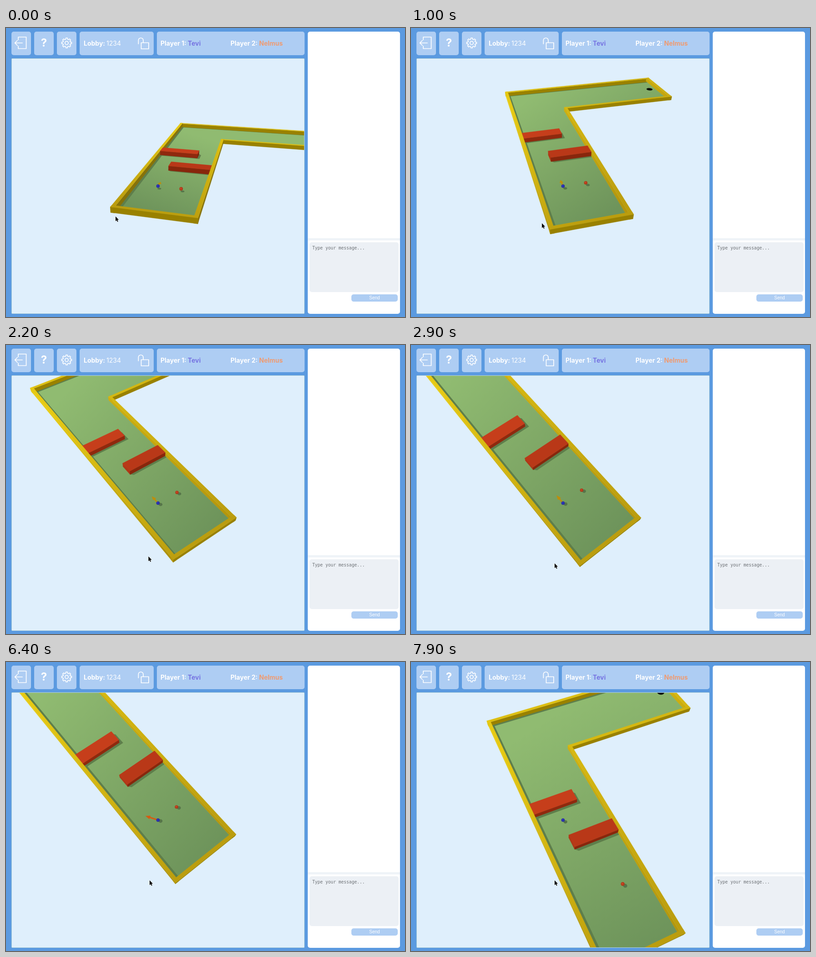
These frames come from a looping animation (878 by 638 pixels, 8000 ms). An HTML page with a canvas:

```html
<!DOCTYPE html>
<html lang="en">
<head>
<meta charset="utf-8">
<title>Minigolf lobby</title>
<style>
html, body { margin: 0; width: 100%; height: 100%; overflow: hidden; background: #5b9ae0; }
body { position: relative; font: 14px/52px Inter, "Liberation Sans", sans-serif; color: #fff; }
div, span, canvas, svg { position: absolute; white-space: nowrap; }
span { top: 0; }
.box { top: 8px; height: 52px; border-radius: 5px; background: #aecdf3; }
.bold { font-weight: 700; }
#view { left: 12px; top: 67px; border-radius: 2px; }
#chat { left: 664px; top: 8px; width: 203px; height: 623px; border-radius: 5px; background: #fff; }
#rule { left: 0; top: 456px; width: 203px; height: 5px; background: #eff3f8; }
#field { left: 4px; top: 465px; width: 196px; height: 110px; border-radius: 5px; background: #ecf0f5; }
#field span { left: 6px; top: 5px; font: 9.6px/15px "DejaVu Sans Mono", monospace; color: #6c7075; }
#send { left: 96px; top: 580px; width: 102px; height: 16px; border-radius: 5px; background: #aecdf3;
  font: 10px/15px "Liberation Sans", sans-serif; text-align: center; }
svg { left: 0; top: 0; fill: none; stroke: #fff; stroke-width: 1.7; stroke-linejoin: round; stroke-linecap: round; }
</style>
</head>
<body>
<div class="box" style="left:12px;width:43px"></div>
<div class="box bold" style="left:62px;width:43px;text-align:center;font-size:24px;line-height:50px">?</div>
<div class="box" style="left:112px;width:43px"></div>
<div class="box" style="left:162px;width:163px">
  <span class="bold" style="left:9px">Lobby:</span><span style="left:59px">1234</span>
</div>
<div class="box bold" style="left:332px;width:325px">
  <span style="left:8px">Player 1:</span><span style="left:68px;color:#7674e2">Tevi</span>
  <span style="left:162px">Player 2:</span><span style="left:225px;color:#ef9b72">Nelmus</span>
</div>
<svg width="660" height="66">
  <path d="M27 26V20H44.5V45.5H27V40M36 33H19.5M25 27.5L19.5 33L25 38.5"/>
  <path id="gear"/><circle cx="133.5" cy="33" r="3.7"/>
  <path d="M297.5 32.5H314V46H297.5ZM302 32V27A5.3 5 0 0 0 291.4 27V35"/>
</svg>
<canvas id="view" width="645" height="564"></canvas>
<div id="chat">
  <div id="rule"></div>
  <div id="field"><span>Type your message...</span></div>
  <div id="send">Send</div>
</div>
<script>
const LOOP = 8000, FOCAL = 775, DIST = 775, SHOT = 6900;
const TOP = 7, BASE = -5, GROUND = -4, RADIUS = 3.8;
const RAD = Math.PI / 180;
const view = document.getElementById('view');
const c = view.getContext('2d');

// Course: u runs across the first lane, v along it; the ball starts at 0,0.
const box = (u0, u1, v0, v1) => ({ u0, u1, v0, v1 });
const walls = {
  left: box(-59, -51, -132, 540), right: box(101, 109, -132, 375),
  near: box(-59, 109, -132, -124), lower: box(101, 460, 367, 375),
  far: box(-59, 460, 532, 540), end: box(452, 460, 367, 540)
};
const blocks = [box(-51, 53, 217, 247.5), box(-2, 101, 109, 140)];
const redBall = { u: 52, v: -1 };
const floor = [[-51, -124], [101, -124], [101, 375], [452, 375], [452, 532], [-51, 532]];
const reds = [
  { top: '#c63e1b', left: '#bf3d1a', right: '#7c210a', front: '#8f290e' },
  { top: '#b93818', left: '#b23616', right: '#7c210a', front: '#88260c' }
];

// time, azimuth, elevation (degrees)
const orbit = [
  [0, 14.8, 24.2], [1000, -14.5, 37.5], [1700, -29.8, 40.5], [2200, -36, 54],
  [2700, -37.9, 66.8], [2900, -38, 68], [3600, -38.4, 69.1], [5200, -38.5, 69.2]
];
const pointer = [[0, 241, 416], [1000, 288, 431], [1700, 307, 443], [2650, 316, 482]];

// Monotone cubic through the keys
function along(keys, t, k) {
  const n = keys.length - 1;
  if (t >= keys[n][0]) return keys[n][k];
  const slope = i => (keys[i + 1][k] - keys[i][k]) / (keys[i + 1][0] - keys[i][0]);
  const tangent = i => {
    if (i === 0) return slope(0);
    if (i === n) return 0;
    const a = slope(i - 1), b = slope(i);
    return a * b > 0 ? 2 * a * b / (a + b) : 0;
  };
  let i = 0;
  while (t >= keys[i + 1][0]) i++;
  const d = keys[i + 1][0] - keys[i][0], s = (t - keys[i][0]) / d, r = 1 - s;
  return keys[i][k] * r * r * (1 + 2 * s) + keys[i + 1][k] * s * s * (3 - 2 * s)
    + d * s * r * (tangent(i) * r - tangent(i + 1) * s);
}

const ramp = (t, a, b) => {
  const s = Math.min(1, Math.max(0, (t - a) / (b - a)));
  return s * s * (3 - 2 * s);
};

// Rolling with friction, one bounce off the left wall
function ballAt(t) {
  const s = Math.max(0, t - SHOT) / 1000;
  const v = 221 * s - 38.5 * s * s;
  return { u: v < 82 ? -0.573 * v : -47 + 0.5 * (v - 82), v };
}

let eye, ball, cosA, sinA, cosE, sinE;

function place(t) {
  const a = along(orbit, t, 1) * RAD, e = along(orbit, t, 2) * RAD;
  ball = ballAt(t);
  eye = {
    u: Math.sin(a) * Math.cos(e) * DIST,
    v: -Math.cos(a) * Math.cos(e) * DIST,
    h: Math.sin(e) * DIST
  };
  // After the shot the eye stays put until the ball drags it along
  for (let s = SHOT; s < t; s += 20) {
    const b = ballAt(Math.min(t, s + 20));
    const du = eye.u - b.u, dv = eye.v - b.v;
    const k = Math.min(1, DIST / Math.hypot(du, dv, eye.h));
    eye = { u: b.u + du * k, v: b.v + dv * k, h: eye.h * k };
  }
  const du = ball.u - eye.u, dv = ball.v - eye.v, flat = Math.hypot(du, dv);
  const dist = Math.hypot(flat, eye.h);
  sinA = -du / flat; cosA = dv / flat;
  sinE = eye.h / dist; cosE = flat / dist;
}

function project(u, v, h) {
  u -= ball.u; v -= ball.v;
  const x = u * cosA + v * sinA, y = v * cosA - u * sinA;
  const k = FOCAL / (DIST + y * cosE - h * sinE);
  return [322.5 + x * k, 282 - (y * sinE + h * cosE) * k, k];
}

function trace(pts, h) {
  c.beginPath();
  for (const p of pts) {
    const q = project(p[0], p[1], p.length > 2 ? p[2] : h);
    c.lineTo(q[0], q[1]);
  }
  c.closePath();
}

function fill(pts, h, colour) {
  trace(pts, h);
  c.fillStyle = c.strokeStyle = colour;
  c.lineWidth = 0.4;
  c.fill();
  c.stroke();
}

function fade(far, near) {
  const p = project(-20, 450, 0), q = project(40, -124, 0);
  const g = c.createLinearGradient(p[0], p[1], q[0], q[1]);
  g.addColorStop(0, far);
  g.addColorStop(1, near);
  return g;
}

const rect = b => [[b.u0, b.v0], [b.u1, b.v0], [b.u1, b.v1], [b.u0, b.v1]];

function solid(b, paint) {
  const side = (ua, va, ub, vb, colour) =>
    fill([[ua, va, TOP], [ub, vb, TOP], [ub, vb, BASE], [ua, va, BASE]], 0, colour);
  if (eye.u < b.u0) side(b.u0, b.v0, b.u0, b.v1, paint.left);
  if (eye.u > b.u1) side(b.u1, b.v0, b.u1, b.v1, paint.right);
  if (eye.v < b.v0) side(b.u0, b.v0, b.u1, b.v0, paint.front);
  fill(rect(b), TOP, paint.top);
}

function shadow({ u0, u1, v0, v1 }) {
  const d = 6.5;
  fill([[u0, v0], [u0, v1], [u1, v1], [u1 + d, v1 - d], [u1 + d, v0 - d], [u0 + d, v0 - d]],
    GROUND, '#5e7e4b');
}

function disc(u, v, r, colour) {
  const pts = [];
  for (let i = 0; i < 32; i++) {
    pts.push([u + r * Math.cos(i * Math.PI / 16), v + r * Math.sin(i * Math.PI / 16)]);
  }
  fill(pts, GROUND, colour);
}

function sphere(b, light, dark) {
  const [x, y, k] = project(b.u, b.v, 0), r = RADIUS * k;
  const g = c.createRadialGradient(x - r * 0.3, y - r * 0.3, 0, x, y, r);
  g.addColorStop(0, light);
  g.addColorStop(1, dark);
  c.beginPath();
  c.arc(x, y, r, 0, 7);
  c.fillStyle = g;
  c.fill();
}

function arrow(t) {
  const turn = 32 * RAD * ramp(t, 3300, 4800);
  const warm = ramp(t, 4500, 5200), hot = ramp(t, 5500, 6300);
  const len = 23 + 3 * warm + 3 * hot;
  const at = (along, across) => [
    -Math.sin(turn) * along + Math.cos(turn) * across,
    Math.cos(turn) * along + Math.sin(turn) * across
  ];
  const neck = len - 10;
  fill([at(3, -1.4), at(neck, -1.4), at(neck, -4), at(len, 0), at(neck, 4), at(neck, 1.4), at(3, 1.4)],
    0, `rgb(${190 + 26 * warm},${142 - 22 * warm - 30 * hot},${12 + 4 * hot})`);
}

function cursor(x, y) {
  c.save();
  c.translate(x - 12, y - 67);
  c.beginPath();
  for (const [px, py] of [[0, 0], [0, 10.5], [2.4, 8.4], [4.1, 12], [5.7, 11.2], [4.1, 7.6], [7.2, 7.4]]) c.lineTo(px, py);
  c.closePath();
  c.lineWidth = 1;
  c.strokeStyle = '#fff';
  c.stroke();
  c.fillStyle = '#000';
  c.fill();
  c.restore();
}

function draw(t) {
  place(t);
  c.fillStyle = '#dfeffc';
  c.fillRect(0, 0, 645, 564);

  fill(floor, GROUND, fade('#90bb71', '#6e945b'));
  c.save();
  trace(floor, GROUND);
  c.clip();
  [walls.left, walls.far, ...blocks].forEach(shadow);
  for (const b of [ball, redBall]) disc(b.u + 4, b.v - 4, 4, '#56754a');
  disc(430, 465, 10, '#0a0c08');
  c.restore();

  const yellow = {
    top: fade('#dcbe12', '#bb9d0e'), left: fade('#d4b511', '#b4960d'),
    right: '#86720a', front: '#998100'
  };
  const lit = { ...yellow, top: fade('#e6c913', '#bb9d0e'), left: fade('#e8cc13', '#a88c0c') };
  const wall = name => solid(walls[name], name === 'left' ? lit : yellow);
  const fromLeft = eye.u < 0;
  ['far', 'end', 'lower', fromLeft ? 'right' : 'left'].forEach(wall);

  const items = blocks.map((b, i) => ({ v: b.v0, paint: () => solid(b, reds[i]) }));
  items.push({ v: redBall.v, paint: () => sphere(redBall, '#d24c26', '#a53416') });
  items.push({
    v: ball.v + 0.1,
    paint() {
      if (t < SHOT + 50) arrow(t);
      sphere(ball, '#343cc8', '#22289c');
    }
  });
  items.sort((p, q) => q.v - p.v).forEach(i => i.paint());

  wall(fromLeft ? 'left' : 'right');
  wall('near');
  cursor(along(pointer, t, 1), along(pointer, t, 2));

  c.lineWidth = 1;
  c.strokeStyle = '#b4d3d8';
  c.strokeRect(0.5, 0.5, 644, 563);
}

function gearPath() {
  let d = '';
  for (let i = 0; i < 8; i++) {
    for (const [off, r] of [[-15, 8.3], [-9, 11], [9, 11], [15, 8.3]]) {
      const a = (i * 45 + off) * RAD;
      d += (d ? 'L' : 'M') + (133.5 + r * Math.cos(a)).toFixed(1) + ' ' + (33 + r * Math.sin(a)).toFixed(1);
    }
  }
  return d + 'Z';
}
document.getElementById('gear').setAttribute('d', gearPath());

const start = performance.now();
function tick() {
  draw((performance.now() - start) % LOOP);
  requestAnimationFrame(tick);
}
tick();
</script>
</body>
</html>
```
